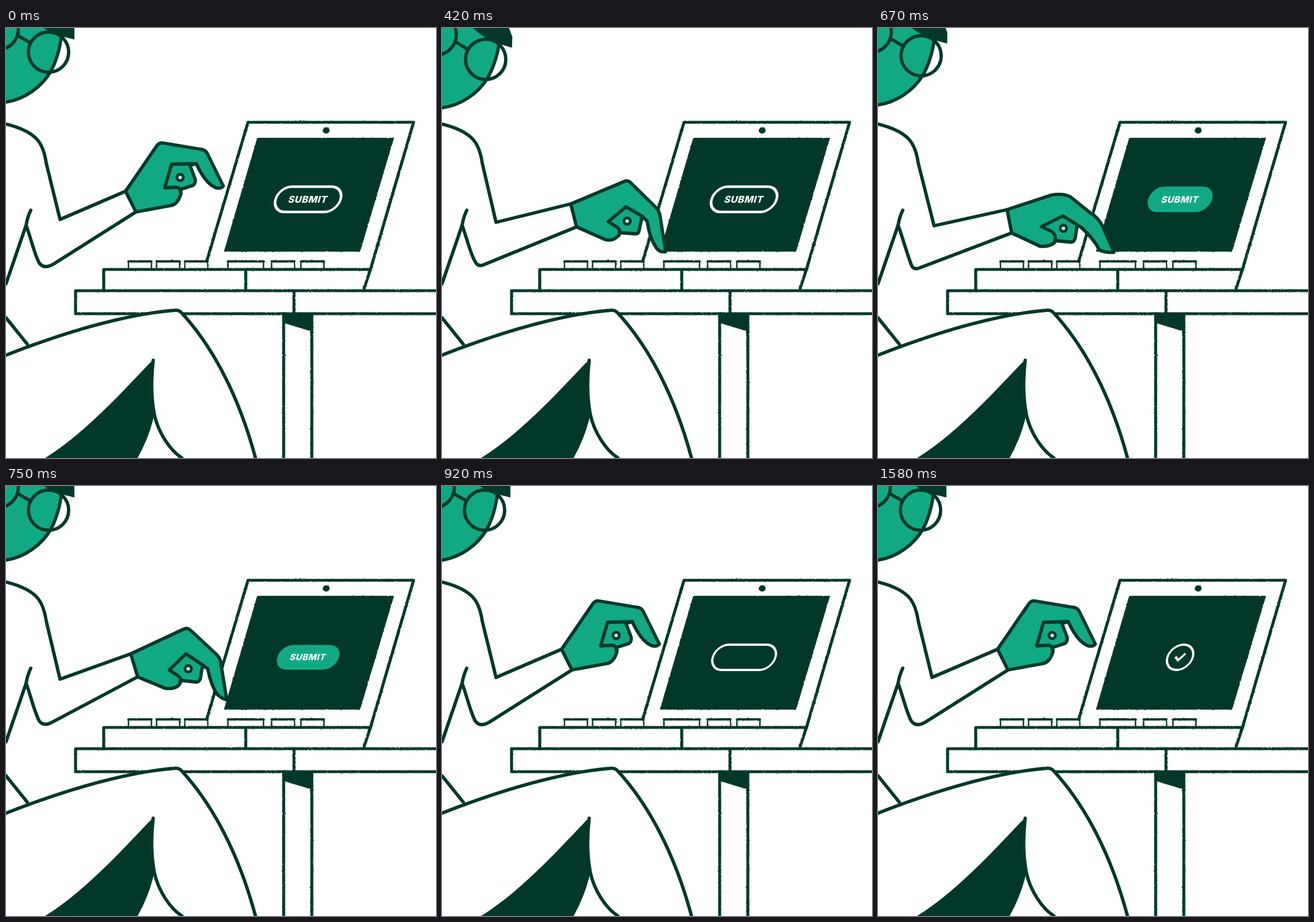
These frames come from a looping animation (748x748 px, 2510 ms). An HTML page:

```html
<!DOCTYPE html>
<html lang="en">
<head>
<meta charset="utf-8">
<title>Submit</title>
<style>
html, body { margin: 0; height: 100%; overflow: hidden; background: #fff; }
svg { display: block; width: 100vw; height: 100vh; }
.line { fill: none; stroke: #01382a; stroke-width: 5.8; stroke-linejoin: round; stroke-linecap: round; }
.dark { fill: #01382a; }
.green { fill: #11a983; }
.white { fill: #fff; }
#label { font: 800 16.5px Inter, sans-serif; letter-spacing: .5px; text-anchor: middle; fill: #fff; }
#check { fill: none; stroke: #fff; stroke-width: 4; }
</style>
</head>
<body>
<svg viewBox="0 0 748 748">
  <filter id="rough" filterUnits="userSpaceOnUse" x="0" y="0" width="748" height="748" color-interpolation-filters="sRGB">
    <feTurbulence type="fractalNoise" baseFrequency=".35" numOctaves="1" seed="4"/>
    <feDisplacementMap in="SourceGraphic" scale="2.5" xChannelSelector="R" yChannelSelector="G"/>
  </filter>

  <g filter="url(#rough)">
    <g class="line" style="stroke-width:5.2">
      <path d="M349 406L421 164H709L634 420L623 453"/>
      <path d="M170 457V420H634M417 420V455"/>
      <path d="M748 457H121V497H748M501 457V497M483 497V748M532 497V748"/>
    </g>
    <path class="dark" d="M437 191H675L616 389H379ZM483 497H532V528L483 513Z"/>
    <ellipse class="dark" cx="557" cy="178" rx="6" ry="5.5"/>
    <path class="line" id="keySides" style="stroke-width:2.5"/>
    <path class="line" id="keyTops" style="stroke-width:4"/>
  </g>

  <g transform="translate(525.5 298) skewX(-16.3)">
    <rect id="pill"/>
    <text id="label" y="6">SUBMIT</text>
    <path id="check" pathLength="1" stroke-dasharray="1 2" d="M-8.500 -1L-2 5L7.500 -6.500"/>
  </g>

  <path class="white" d="M0 569C100 530 200 499 293 491Q301 490 306 496C360 555 405 640 434 748H0Z"/>
  <path class="dark" d="M257 576C215 618 145 700 68 748H229Q250 710 258 672Q250 630 257 576Z"/>
  <g class="line">
    <path d="M0 569C100 530 200 499 293 491Q301 490 306 496C360 555 405 640 434 748"/>
    <path d="M256 578Q250 630 258 672C265 705 286 735 306 748"/>
    <path d="M43 317Q37 330 35 343L0 445M0 504L37 550"/>
    <path id="arm"/>
  </g>

  <g id="head">
    <path class="line green" style="fill:#11a983" d="M97 10Q92 50 78 75C62 103 32 124 0 129L-60 131V-60H97Z"/>
    <path class="dark" d="M48 -13Q73 8 95 14L119 20V1L113 -13V-40H40Z"/>
    <g class="line">
      <circle cx="74" cy="42" r="35"/>
      <circle cx="-14" cy="2" r="35.500"/>
      <path d="M20 13L41 25"/>
    </g>
  </g>

  <path class="line" id="hand" style="fill:#11a983"/>
  <path class="line" id="fingers"/>
  <circle class="line" id="ring" r="5.500" style="fill:#fff;stroke-width:5"/>
</svg>
<script>
const $ = id => document.getElementById(id);
const set = (id, attrs) => {
  for (const name in attrs) $(id).setAttribute(name, attrs[name]);
};

// Each pose: hand outline | inner fingers | arm | ring centre
const shoulder = "|M0 167Q40 177 55 195Q66 208 70 235";
const up = "M208 284L263 204Q267 199 273 200L339 211Q347 212 350 218L378 275Q373 281 363 277Q346 269 331 236L320 239L329 263Q330 271 325 274L303 281Q306 286 303 292Q298 307 286 309L226 320Z" +
  "|M331 236L288 237L276 278L296 277Q304 278 303 285" + shoulder +
  "L94 333L208 284M226 320L82 411Q66 420 58 409C50 395 44 368 35 343|303 260";
const reach = "M224 306L317 267Q323 264 328 269L371 311Q377 317 379 325L389 389Q380 391 374 384Q361 366 357 336L348 328L343 352Q342 358 337 358L309 356Q309 361 305 363Q297 371 284 368L234 346Z" +
  "|M349 328L320 311L289 337L304 346Q311 351 308 358" + shoulder +
  "L94 338L224 306M234 346L72 412Q63 416 58 407C50 395 44 368 35 343|322 336";
const press = "M232 340L295 332Q331 328 350 338L374 352Q397 364 408 385L437 408Q420 413 404 411Q392 385 354 374L351 374L348 396Q346 404 341 404L314 402Q311 404 308 404Q299 408 286 407L236 381Z" +
  "|M352 374L330 362L284 371L305 378Q315 385 313 397" + shoulder +
  "L101 352L232 340M236 381L66 423Q61 424 60 420C52 394 44 368 35 343|328 379";
const lift = "M217 292L309 249Q315 246 320 250L363 290Q370 296 373 304L384 372Q375 370 367 362Q356 345 351 318L342 312L338 335Q336 341 331 341L303 338Q304 344 300 347Q292 354 277 352L229 332Z" +
  "|M343 312L313 292L284 320L299 330Q306 335 303 342" + shoulder +
  "L94 336L217 292M229 332L80 411Q66 419 58 409C50 395 44 368 35 343|317 318";

const mix = (a, b, k) => {
  const end = b.match(/\d+/g);
  let i = 0;
  return a.replace(/\d+/g, n => +n + (end[i++] - n) * k);
};

const outline = (width, text = false, stroke = 3.8) => ({ width, height: 44, text, stroke });
const solid = scale => ({ width: 117 * scale, height: 47 * scale, text: true, scale });
const ready = outline(113, true, 4.5);
const done = outline(44);

// start, pose, head drop, button, check progress
const steps = [
  [0, up, 0, ready],
  [330, mix(up, reach, .5), .5, ready],
  [420, reach, 1, ready],
  [500, mix(reach, press, .7), 1, ready],
  [580, press, 1, solid(1)],
  [670, mix(press, lift, .5), .5, solid(.95)],
  [750, lift, 0, solid(.915)],
  [830, mix(lift, up, .7), 0, outline(111, true)],
  [920, up, 0, outline(109)],
  [1000, up, 0, outline(89)],
  [1080, up, 0, outline(61)],
  [1170, up, 0, done],
  [1420, up, 0, done, .3],
  [1500, up, 0, done, .7],
  [1580, up, 0, done, 1],
];
const keys = [[213, 253], [262, 302], [311, 351], [386, 448], [462, 502], [513, 553]];

function drawKeys(pressed) {
  let tops = "", sides = "";
  for (const [left, right] of keys) {
    const y = pressed && left === 386 ? 411 : 406;
    tops += `M${left} ${y}H${right}`;
    sides += `M${left} ${y}V417M${right} ${y}V417`;
  }
  set("keyTops", { d: tops });
  set("keySides", { d: sides });
}

function draw([, pose, drop, button, check = 0]) {
  const [hand, fingers, arm, ring] = pose.split("|");
  set("hand", { d: hand });
  set("fingers", { d: fingers });
  set("arm", { d: arm });
  const [cx, cy] = ring.split(" ");
  set("ring", { cx, cy });
  set("head", { transform: `translate(${3.5 * drop} ${10 * drop}) rotate(${2 * drop})` });
  drawKeys(pose === press);

  const { width, height, text, stroke = 0, scale = 1 } = button;
  set("pill", {
    x: -width / 2, y: -height / 2, width, height, rx: height / 2,
    fill: stroke ? "none" : "#11a983", stroke: stroke ? "#fff" : "none", "stroke-width": stroke,
  });
  set("label", { visibility: text ? "visible" : "hidden", transform: `scale(${scale})` });
  set("check", { visibility: check ? "visible" : "hidden", "stroke-dashoffset": 1 - check });
}

let current;
function tick() {
  const time = performance.now() % 2510;
  const step = steps.findLast(([start]) => start <= time);
  if (step !== current) draw(current = step);
  requestAnimationFrame(tick);
}
tick();
</script>
</body>
</html>
```
